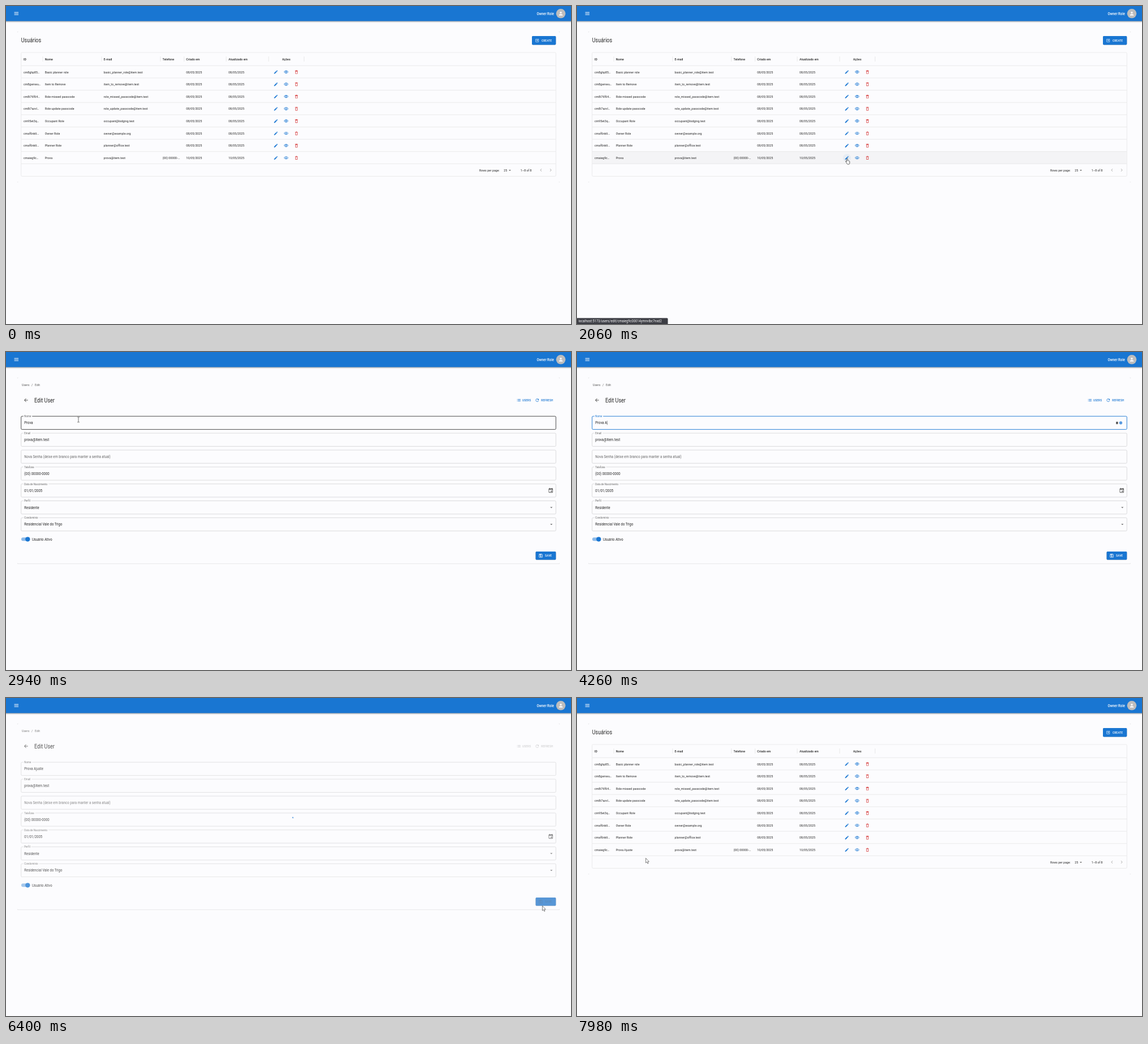
An HTML page that plays this animation: 998x561 px, repeating every 8 s.

```html
<!DOCTYPE html>
<html lang="pt">
<head>
<meta charset="utf-8">
<title>Usuários</title>
<style>
html, body { margin: 0; width: 100%; height: 100%; overflow: hidden; background: #fcfcfe; }
svg { display: block; width: 100%; height: 100%; }
text { font-family: Roboto, "Open Sans", sans-serif; letter-spacing: .01em; white-space: pre; }
.bar { filter: drop-shadow(0 1px 1.2px rgba(0,0,0,.42)); }
.paper { filter: drop-shadow(0 .7px .5px rgba(0,0,0,.42)); }
.raised { filter: drop-shadow(0 .8px .7px rgba(0,0,0,.4)); }
</style>
</head>
<body>
<svg id="stage" viewBox="0 0 998 561" xmlns="http://www.w3.org/2000/svg"></svg>
<script>
const LOOP = 8000, BLUE = '#1976d2', INK = '#222', BG = '#fcfcfe';
const NARROW = .885; // condensed look for all interface text
const OPEN = 2300, FOCUS = 3250, TYPE = 4120, KEY = 120, SAVE = 6310, BACK = 6760;

const ICONS = {
  menu: 'M3 18h18v-2H3v2zm0-5h18v-2H3v2zm0-7v2h18V6H3z',
  person: 'M12 12c2.21 0 4-1.79 4-4s-1.79-4-4-4-4 1.79-4 4 1.79 4 4 4zm0 2c-2.67 0-8 1.34-8 4v2h16v-2c0-2.66-5.33-4-8-4z',
  add: 'M19 3H5c-1.1 0-2 .9-2 2v14c0 1.1.9 2 2 2h14c1.1 0 2-.9 2-2V5c0-1.1-.9-2-2-2zm0 16H5V5h14v14zm-8-2h2v-4h4v-2h-4V7h-2v4H7v2h4z',
  edit: 'M3 17.25V21h3.75L17.81 9.94l-3.75-3.75L3 17.25zM20.71 7.04c.39-.39.39-1.02 0-1.41l-2.34-2.34c-.39-.39-1.02-.39-1.41 0l-1.83 1.83 3.75 3.75 1.83-1.83z',
  eye: 'M12 6c3.79 0 7.17 2.13 8.82 5.5C19.17 14.87 15.79 17 12 17s-7.17-2.13-8.82-5.5C4.83 8.13 8.21 6 12 6m0-2C7 4 2.73 7.11 1 11.5 2.73 15.89 7 19 12 19s9.27-3.11 11-7.5C21.27 7.11 17 4 12 4zm0 5c1.38 0 2.5 1.12 2.5 2.5S13.38 14 12 14s-2.5-1.12-2.5-2.5S10.62 9 12 9m0-2c-2.48 0-4.5 2.02-4.5 4.5S9.52 16 12 16s4.5-2.02 4.5-4.5S14.48 7 12 7z',
  bin: 'M6 19c0 1.1.9 2 2 2h8c1.1 0 2-.9 2-2V7H6v12zM8 9h8v10H8V9zm7.5-5l-1-1h-5l-1 1H5v2h14V4h-3.5z',
  arrow: 'M20 11H7.83l5.59-5.59L12 4l-8 8 8 8 1.41-1.41L7.83 13H20v-2z',
  list: 'M3 13h2v-2H3v2zm0 4h2v-2H3v2zm0-8h2V7H3v2zm4 4h14v-2H7v2zm0 4h14v-2H7v2zM7 7v2h14V7H7z',
  refresh: 'M17.65 6.35C16.2 4.9 14.21 4 12 4c-4.42 0-8 3.58-8 8s3.58 8 8 8c3.73 0 6.84-2.55 7.73-6h-2.08c-.82 2.33-3.04 4-5.65 4-3.31 0-6-2.69-6-6s2.69-6 6-6c1.66 0 3.14.69 4.22 1.78L13 11h7V4l-2.35 2.35z',
  save: 'M17 3H5c-1.1 0-2 .9-2 2v14c0 1.1.9 2 2 2h14c1.1 0 2-.9 2-2V7l-4-4zm2 16H5V5h11.17L19 7.83V19zm-7-7c-1.66 0-3 1.34-3 3s1.34 3 3 3 3-1.34 3-3-1.34-3-3-3zM6 6h9v4H6z',
  date: 'M17 12h-5v5h5v-5zM16 1v2H8V1H6v2H5c-1.1 0-2 .9-2 2v14c0 1.1.9 2 2 2h14c1.1 0 2-.9 2-2V5c0-1.1-.9-2-2-2h-1V1h-2zm3 18H5V8h14v11z',
  down: 'M7 10l5 5 5-5z',
  prev: 'M15.41 7.41L14 6l-6 6 6 6 1.41-1.41L10.83 12z',
  next: 'M10 6L8.59 7.41 13.17 12l-4.58 4.59L10 18l6-6z'
};

const POINTERS = {
  arrow: '<path d="M0 0v8.4l1.9-1.7 1.4 3 1.3-.6-1.3-2.9h2.5z" fill="#fff" stroke="#333" stroke-width=".6"/>',
  hand: '<path d="M0 0c-.8 0-.9.5-.9 1v4.2l-1-1c-.7-.5-1.3.2-.9.8l2 3.3c.5 1 .9 1.6 2 1.6h1.2c1.3 0 1.9-.9 1.9-2.2V5.100c0-.6-.5-.9-1-.7-.1-.6-.7-.8-1.200-.5-.2-.6-.7-.7-1.200-.4V1c0-.5-.1-1-.9-1z" fill="#fff" stroke="#222" stroke-width=".7"/>',
  beam: '<path d="M-1.900-4.500h1.500l.4.4.4-.4h1.500M0-4.100v8M-1.900 4.300h1.500l.4-.4.4.4h1.500" fill="none" stroke="#333" stroke-width=".7"/>'
};

// time, x, y of the pointer
const PATH = [
  [600, 672, 513], [840, 650, 460], [1100, 595.5, 361.500], [1400, 525, 295], [1680, 478, 268],
  [2280, 477, 270], [2400, 461.5, 276.500], [2500, 440, 262], [2800, 190, 136], [2940, 128, 119.500],
  [3240, 108, 121], [3600, 104, 123], [4940, 104, 123], [5500, 560, 150], [5600, 693, 182],
  [5740, 890, 385], [5830, 938, 391], [6020, 949, 361], [6320, 949, 361], [6400, 947.5, 366.500],
  [6520, 941, 390], [6600, 920, 380], [7000, 660, 340], [7400, 270, 303], [7600, 112, 268],
  [7820, 106, 271], [7980, 121.5, 282.500]
];

const USERS = [
  ['cm8ghp85…', 'Basic planner role', 'basic_planner_role@item.test'],
  ['cm8gwnwu…', 'Item to Remove', 'item_to_remove@item.test'],
  ['cm8i76f64…', 'Role missed passcode', 'role_missed_passcode@item.test'],
  ['cm8i7azvl…', 'Role update passcode', 'role_update_passcode@item.test'],
  ['cm95et3q…', 'Occupant Role', 'occupant@lodging.test'],
  ['cmaf6nk6…', 'Owner Role', 'owner@example.org'],
  ['cmaf6nk6…', 'Planner Role', 'planner@office.test'],
  ['cmaieg9c…', 'Prova', 'prova@item.test', '(00) 00000-…']
];
const ADDED = ' Ajuste';

const FIELDS = [
  ['Nome', 'Prova'], ['Email', 'prova@item.test'],
  ['Nova Senha (deixe em branco para manter a senha atual)', ''],
  ['Telefone', '(00) 00000-0000'], ['Data de Nascimento', '01/01/2005'],
  ['Perfil', 'Residente'], ['Condomínio', 'Residencial Vale do Trigo']
];

const clamp = v => Math.max(0, Math.min(1, v));
const easeOut = u => 1 - (1 - clamp(u)) ** 3;
const pen = document.createElement('canvas').getContext('2d');

function textWidth(s, size) {
  pen.font = '100px Roboto, "Open Sans", sans-serif';
  return (pen.measureText(s).width / 100 + s.length * .01) * size * NARROW;
}
const text = (x, y, s, size = 5.82, fill = INK, more = '') =>
  `<text transform="translate(${x} ${y + size * .36}) scale(${NARROW} 1)" font-size="${size}" fill="${fill}" ${more}>${s}</text>`;
const rect = (x, y, w, h, fill, more = '') =>
  `<rect x="${x}" y="${y}" width="${w}" height="${h}" fill="${fill}" ${more}/>`;
const line = (x1, y1, x2, y2, color, w = .6) =>
  `<path d="M${x1} ${y1}L${x2} ${y2}" stroke="${color}" stroke-width="${w}"/>`;
const icon = (name, x, y, size, fill) =>
  `<path d="${ICONS[name]}" fill="${fill}" transform="translate(${x - size / 2} ${y - size / 2}) scale(${size / 24})"/>`;
const BOLD = 'font-weight="500"';

function pointerAt(t) {
  const i = PATH.findIndex(p => p[0] > t);
  if (i < 1) return i ? PATH[PATH.length - 1].slice(1) : PATH[0].slice(1);
  const [t0, x0, y0] = PATH[i - 1], [t1, x1, y1] = PATH[i], u = (t - t0) / (t1 - t0);
  return [x0 + (x1 - x0) * u, y0 + (y1 - y0) * u];
}

const header = () =>
  rect(-4, -4, 1006, 30.6, BLUE, 'class="bar"') + icon('menu', 18.3, 13.3, 10, '#fff') +
  text(968, 13.3, 'Owner Role', 6.66, '#fff', BOLD + ' text-anchor="end"') +
  '<circle cx="980" cy="13.3" r="8.3" fill="#bdbdbd"/>' + icon('person', 980, 13.3, 10, BG);

const paper = bottom => rect(20, 45, 958, bottom - 45, BG, 'rx="1.7" class="paper"');

function listPage(t, [mx, my]) {
  const shown = t > 600;
  let s = paper(311) + text(26.7, 60.5, 'Usuários', 10) +
    rect(929, 53, 42.300, 15.500, BLUE, 'rx="1.7" class="raised"') +
    icon('add', 938.3, 60.7, 7.5, '#fff') + text(946, 60.7, 'CREATE', 5.4, '#fff', BOLD + ' style="letter-spacing:.028em"') +
    rect(26.7, 82, 944.600, 218.400, 'none', 'stroke="#e0e0e0" stroke-width=".6" rx="1.7"');

  const cols = [31, 68.700, 172.600, 276.500, 318.300, 393];
  ['ID', 'Nome', 'E-mail', 'Telefone', 'Criado em', 'Atualizado em'].forEach((h, i) => s += text(cols[i], 93.7, h, 5.82, INK, BOLD));
  s += text(495, 93.7, 'Ações', 5.82, INK, BOLD + ' text-anchor="middle"');
  for (const x of [65, 168.800, 272.700, 314.500, 389, 464, 526.500]) s += line(x, 89, x, 98, '#dcdcdc');

  USERS.forEach(([id, name, mail, phone = ''], i) => {
    const top = 105.3 + i * 21.63, y = top + 11.2, last = i === 7;
    const day = last ? '10/05/2025' : '08/05/2025';
    if (shown && mx > 27 && mx < 971 && my > top && my < top + 21.63) s += rect(27, top, 944, 21.6, '#f4f4f6');
    if (last && t > BACK) name += ADDED;
    [id, name, mail, phone, day, day].forEach((v, k) => { if (v) s += text(cols[k], y, v); });
    if (last && Math.hypot(mx - 477, my - y) < 6) s += `<circle cx="476.7" cy="${y}" r="7" fill="${BLUE}" opacity=".06"/>`;
    s += icon('edit', 476.7, y, 8.300, BLUE) + icon('eye', 494.8, y, 8.300, BLUE) + icon('bin', 513, y, 8.300, '#d32f2f');
    s += line(27, top, 971, top, '#dedede');
  });
  return s + line(27, 278.3, 971, 278.3, '#dedede') +
    text(836, 290, 'Rows per page:') + text(879.3, 289.8, '25') + icon('down', 890, 289.8, 9, '#666') +
    text(908.8, 290, '1–8 of 8') + icon('prev', 945, 289.5, 10, '#b5b5b5') + icon('next', 962, 289.5, 10, '#b5b5b5');
}

function field(i, t, hover) {
  let [label, value] = FIELDS[i];
  const y = 125 + i * 29.85, top = y - 11.7;
  const focused = i === 0 && t >= FOCUS && t < SAVE;
  const keys = i ? 0 : Math.max(0, Math.min(ADDED.length, Math.floor((t - TYPE) / KEY) + 1));
  value += ADDED.slice(0, keys);

  const border = focused ? BLUE : hover ? INK : '#c4c4c6';
  let s = rect(26.7, top, 944.600, 23.300, 'none', `rx="1.7" stroke="${border}" stroke-width="${focused ? .9 : hover ? .8 : .6}"`);
  if (!value) return s + text(32.3, y, label, 6.66, '#666');

  const p = easeOut((t - OPEN - (i === 3 ? 40 : 0)) / 200), size = 6.66 - 1.66 * p;
  if (p > .5) s += rect(30.5, top - 1, textWidth(label, 5) + 3.6, 2, BG);
  s += text(32.3, y - 11.7 * p, label, size, focused ? BLUE : '#666') + text(32.3, y, value, 6.66);
  if (i === 4) s += icon('date', 962.3, y, 10, '#555');
  if (i > 4) s += icon('down', 963.3, y, 10, '#666');
  if (focused) {
    const since = t < TYPE ? t - FOCUS : t - Math.min(t, TYPE + 6 * KEY);
    const x = 32.3 + textWidth(value, 6.66) + .3;
    if (Math.floor(since / 530) % 2 === 0) s += line(x, y - 3.6, x, y + 3.6, INK, .5);
    s += rect(952.2, y - 2, 3.4, 4.2, '#555', 'rx=".6"') + `<circle cx="960.5" cy="${y}" r="2.7" fill="#5a9be0"/>`;
  }
  return s;
}

function formPage(t) {
  const [hx, hy] = pointerAt(t - 80);
  const busy = clamp((t - SAVE) / 200), saving = t >= SAVE;
  const link = saving ? '#c4c4c6' : BLUE, spaced = BOLD + ' style="letter-spacing:.028em"';
  let s = paper(373.7) + `<g opacity="${1 - .5 * busy}">` +
    text(28, 58, 'Users', 5.82, '#555') + text(45, 58, '/', 5.82, '#555') + text(51, 58.3, 'Edit', 5.82, '#555') +
    icon('arrow', 35.3, 85, 10, '#555') + text(50, 85, 'Edit User', 10) +
    icon('list', 905.8, 85, 8.300, link) + text(912, 85, 'USERS', 5.4, link, spaced) +
    icon('refresh', 938.3, 85, 8.300, link) + text(945.3, 85, 'REFRESH', 5.4, link, spaced);
  FIELDS.forEach((f, i) => {
    const hover = !saving && hx > 27 && hx < 971 && Math.abs(hy - 125 - i * 29.85) < 11.7 && (t < TYPE || t > 4940);
    s += field(i, t, hover);
  });
  s += rect(27, 327.3, 14.200, 5.900, BLUE, 'rx="2.9" opacity=".5"') +
    `<circle cx="38.3" cy="330.3" r="4.1" fill="${BLUE}"/>` + text(46, 330.3, 'Usuário Ativo', 6.66) + '</g>';

  const on = saving ? 1 - .7 * busy : clamp((t - 2360) / 250);
  s += rect(935.6, 352, 35.700, 14.600, '#dedee0', 'rx="1.7"') +
    rect(935.6, 352, 35.700, 14.600, BLUE, `rx="1.7" class="raised" opacity="${on}"`);
  const ink = saving ? '#5e8cba' : '#fff';
  s += icon('save', 944.6, 359.3, 8.300, ink) + text(952, 359.3, 'SAVE', 5.4, ink, spaced);

  if (t > 6380) {
    const sweep = Math.min(30, .5 + (t - 6380) * .08);
    s += `<circle cx="501" cy="216" r="7.6" fill="none" stroke="${BLUE}" stroke-width="1.4" stroke-dasharray="${sweep} 60" transform="rotate(${-50 + (t - 6400) * .257} 501 216)"/>`;
  }
  return s;
}

function statusBubble(t) {
  if (t < 1700 || t > 2440) return '';
  const alpha = Math.min(clamp((t - 1700) / 120), 1 - clamp((t - 2240) / 190));
  return `<g opacity="${alpha}">` + rect(-2, 550.500, 162.500, 13, '#3c3d44', 'rx="1.5"') +
    text(2.5, 555.8, 'localhost:5173/users/edit/cmaieg9c00014ymnvlbc7nxd2', 6.400, '#fff') + '</g>';
}

function pointer(t, form, [x, y]) {
  if (t < 600 || t > TYPE && t < 4940) return '';
  const inside = x > 27 && x < 971;
  let kind = 'arrow';
  if (!form) { if (Math.hypot(x - 477, y - 268) < 7) kind = 'hand'; }
  else if (inside && y > 262 && y < 316 || x > 935 && x < 971 && y > 352 && y < 366) kind = 'hand';
  else if (inside && y > 113 && y < 256) kind = 'beam';
  return `<g transform="translate(${x} ${y})">${POINTERS[kind]}</g>`;
}

const stage = document.getElementById('stage');
let last = '';
function draw(now) {
  const t = now % LOOP, form = t >= OPEN && t < BACK, at = pointerAt(t);
  const scene = (form ? formPage(t) : listPage(t, at)) + header() + statusBubble(t) + pointer(t, form, at);
  if (scene !== last) stage.innerHTML = last = scene;
  requestAnimationFrame(draw);
}
draw(0);
</script>
</body>
</html>
```
